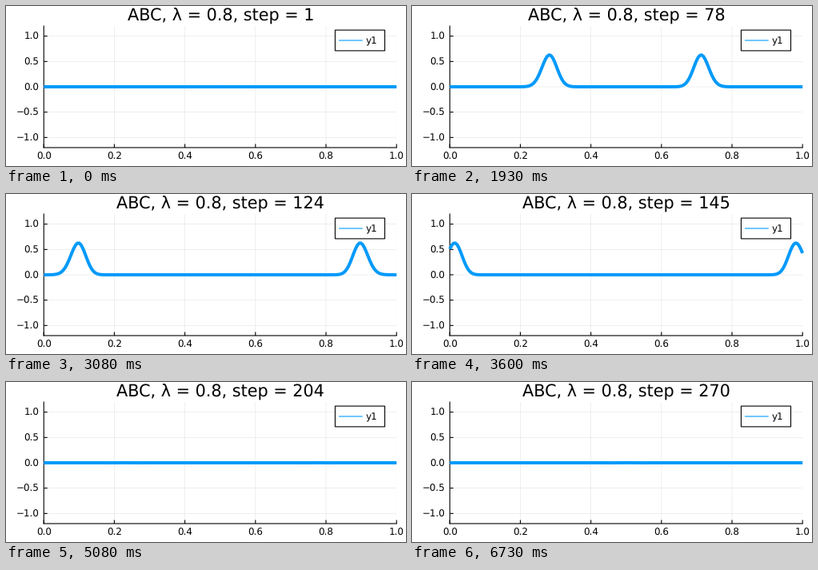
These frames come from a looping animation (500 by 200 pixels, 6.76 s). A matplotlib script:

```python
import numpy as np
import matplotlib.pyplot as plt
from matplotlib.animation import FuncAnimation
from matplotlib.patches import Rectangle
from matplotlib.transforms import Affine2D

W, H, DPI = 500, 200, 100
LEFT, RIGHT, TOP, BOTTOM = 47.24, 488.19, 25.0, 177.0
Y_MAX = 1.2
TICK_LEN = 4.5
BLUE = "#009AFA"

COURANT = 0.8
CELLS = 200
STEPS = 270
TICK_MS, STEP_MS, LOOP_MS = 10, 25, 6760


def pt(px):
    return px * 72 / DPI


def simulate():
    """1D FDTD with an additive Gaussian source and first-order absorbing ends."""
    e, h = np.zeros(CELLS), np.zeros(CELLS - 1)
    dt = COURANT / (CELLS - 1)
    mur = (COURANT - 1) / (COURANT + 1)
    source = CELLS // 2 - 1
    history = []
    for n in range(1, STEPS + 1):
        h += COURANT * np.diff(e)
        old = e.copy()
        e[1:-1] += COURANT * np.diff(h)
        e[source] += np.exp(-((n * dt - 0.1) / 0.03) ** 2)
        e[0] = old[1] + mur * (e[1] - old[0])
        e[-1] = old[-2] + mur * (e[-2] - old[-1])
        history.append(e.copy())
    return history


plt.rcParams.update({
    "font.family": "DejaVu Sans",
    "text.hinting": "none",
    "path.simplify": False,
    "path.snap": False,
})

fig = plt.figure(figsize=(W / DPI, H / DPI), dpi=DPI, facecolor="white")
pixels = Affine2D().scale(1 / W, -1 / H).translate(0, 1) + fig.transFigure

xticks, yticks = np.linspace(0, 1, 6), np.linspace(-1, 1, 5)
ax = fig.add_axes([LEFT / W, 1 - BOTTOM / H, (RIGHT - LEFT) / W, (BOTTOM - TOP) / H])
ax.set(xlim=(0, 1), ylim=(-Y_MAX, Y_MAX), xticks=xticks, yticks=yticks)
ax.xaxis.set_major_formatter("{x:.1f}")
ax.yaxis.set_major_formatter("{x:.1f}")
ax.tick_params(length=0, pad=pt(5.8), labelsize=pt(11.86))
ax.grid(color="black", alpha=0.1, linewidth=pt(0.6))
ax.set_axisbelow(True)
ax.spines[["top", "right"]].set_visible(False)
ax.spines[["left", "bottom"]].set_linewidth(pt(1.1))

# Inward ticks
tick_style = dict(color="black", linewidth=pt(1.1), clip_on=False, zorder=2.5)
ax.vlines(xticks, -Y_MAX, -Y_MAX + TICK_LEN * 2 * Y_MAX / (BOTTOM - TOP), **tick_style)
ax.hlines(yticks, 0, TICK_LEN / (RIGHT - LEFT), **tick_style)

x = np.linspace(0, 1, CELLS)
wave, = ax.plot(x, 0 * x, color=BLUE, linewidth=pt(4), solid_capstyle="butt",
                solid_joinstyle="round", clip_on=False, zorder=3)

title = ax.text((LEFT + RIGHT) / 2 + 0.7, 19, "", transform=pixels, ha="center",
                va="baseline", fontsize=pt(20.8))

# Legend
ax.add_patch(Rectangle((411.4, 30.1), 62.1, 25.8, transform=pixels, facecolor="white",
                       edgecolor="black", linewidth=pt(1.1), zorder=4))
ax.plot([416, 445.7], [43, 43], transform=pixels, color=BLUE, linewidth=pt(1.1),
        solid_capstyle="butt", zorder=5)
ax.text(450, 43, "y1", transform=pixels, va="center_baseline",
        fontsize=pt(11.86), zorder=5)
ax.set(xlim=(0, 1), ylim=(-Y_MAX, Y_MAX))

fields = simulate()


def update(tick):
    i = min(tick * TICK_MS // STEP_MS, STEPS - 1)
    wave.set_ydata(fields[i])
    title.set_text(f"ABC, λ = {COURANT}, step = {i + 1}")
    return wave, title


anim = FuncAnimation(fig, update, frames=LOOP_MS // TICK_MS, interval=TICK_MS,
                     repeat=True, repeat_delay=0, blit=False)
plt.show()
```
